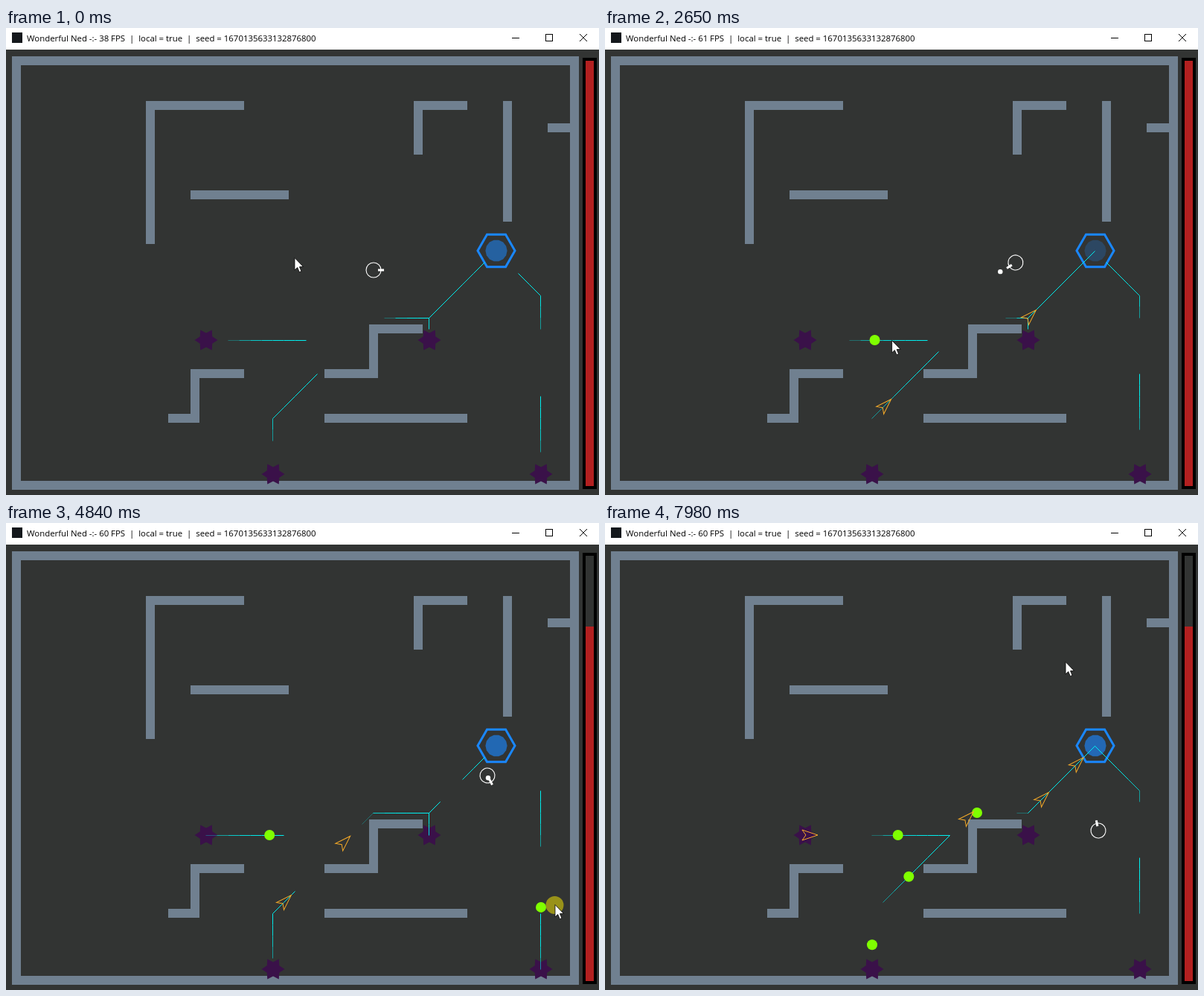
Animation of 797x627 px, one loop 8 s. Source, as an HTML page with a canvas:

```html
<!DOCTYPE html>
<html lang="en">
<head>
<meta charset="utf-8">
<title>Wonderful Ned</title>
<style>
  html, body { margin: 0; width: 100%; height: 100%; overflow: hidden; background: #323433; }
  canvas { display: block; }
</style>
</head>
<body>
<canvas id="stage" width="797" height="627"></canvas>
<script>
const ctx = document.getElementById('stage').getContext('2d');
const LOOP = 8000, CELL = 15, ORIGIN = 14;
const SPEED = 0.0504, BULLET_SPEED = 0.25, RANGE = 200;
const BG = '#323433', WALL = '#708090', BLUE = '#1a87ff', CYAN = '#00f0f0';
const BASE = { x: 659, y: 299 };

// Walks the grid from a cell: 'UR9' means nine cells up and right. Returns every node passed.
function walk(x, y, moves) {
  const node = () => ({ x: ORIGIN + x * CELL, y: ORIGIN + y * CELL });
  const nodes = [node()];
  for (const [, dirs, count] of moves.matchAll(/([UDLR]+)(\d+)/g)) {
    for (let i = 0; i < count; i++) {
      x += dirs.includes('R') - dirs.includes('L');
      y += dirs.includes('D') - dirs.includes('U');
      nodes.push(node());
    }
  }
  return nodes;
}

const WALLS = [
  walk(0, 2, 'R50 D38 L50 U38'),
  walk(20, 6, 'L8 D12'),
  walk(16, 14, 'R8'),
  walk(40, 6, 'L4 D4'),
  walk(44, 6, 'D10'),
  walk(48, 8, 'R2'),
  walk(20, 30, 'L4 D4 L2'),
  walk(28, 30, 'R4 U4 R4'),
  walk(28, 34, 'R12')
];

// Each spawner sends its crew (o ball, > dart) at a fixed interval; `hit` is when the first is shot.
const SPAWNERS = [
  { nodes: walk(17, 27, 'R13 UR2 R5 UR6'), first: 795, every: 2356, crew: 'ooo>', hit: 3400 },
  { nodes: walk(23, 39, 'U5 UR9 R5 UR6'), first: 665, every: 2222, crew: '>>oo' },
  { nodes: walk(37, 27, 'U2 UR6'), first: 1984, every: 3539, crew: '>>' },
  { nodes: walk(47, 39, 'U16 UL4'), first: 3192, every: 5000, crew: 'o', hit: 5515 }
];

// Key points: time, x, y
const MOUSE = [
  [0, 388, 309], [1860, 347, 420], [2700, 388, 420], [3250, 618, 388], [3390, 626, 386],
  [4840, 738, 513], [5450, 722, 512], [5860, 676, 512], [6960, 621, 347], [7980, 619, 187]
];
const PLAYER = [
  [0, 494, 325], [1860, 541, 317], [3390, 562, 313], [4840, 647, 339],
  [5860, 692, 366], [6960, 683, 458], [7980, 663, 413]
];

function at(keys, t) {
  let i = 1;
  while (i < keys.length - 1 && keys[i][0] < t) i++;
  const [t0, x0, y0] = keys[i - 1], [t1, x1, y1] = keys[i];
  const f = Math.min(1, (t - t0) / (t1 - t0));
  return { x: x0 + (x1 - x0) * f, y: y0 + (y1 - y0) * f };
}

function aim(t) {
  const p = at(PLAYER, t), m = at(MOUSE, t);
  return { ...p, angle: Math.atan2(m.y - p.y, m.x - p.x) };
}

const SHOTS = [2560, 2692, 3285, 4825, 5250, 5360].map(start => ({ start, ...aim(start) }));

function disc(x, y, r, color) {
  ctx.fillStyle = color;
  ctx.beginPath();
  ctx.arc(x, y, r, 0, Math.PI * 2);
  ctx.fill();
}

function poly(points) {
  ctx.beginPath();
  points.forEach(([x, y]) => ctx.lineTo(x, y));
  ctx.closePath();
}

function ring(count, radius) {
  return Array.from({ length: count }, (_, i) => {
    const a = i * 2 * Math.PI / count, r = radius(i);
    return [Math.cos(a) * r, Math.sin(a) * r];
  });
}

function fill(color) {
  ctx.fillStyle = color;
  ctx.fill();
}

function stroke(color, width) {
  ctx.strokeStyle = color;
  ctx.lineWidth = width;
  ctx.stroke();
}

function line(x0, y0, x1, y1, color) {
  ctx.beginPath();
  ctx.moveTo(x0, y0);
  ctx.lineTo(x1, y1);
  stroke(color, 1);
}

function placed(x, y, angle, draw) {
  ctx.save();
  ctx.translate(x, y);
  ctx.rotate(angle);
  draw();
  ctx.restore();
}

function titleBar(t) {
  ctx.fillStyle = '#fff';
  ctx.fillRect(0, 0, 797, 29);
  ctx.fillStyle = '#14181c';
  ctx.fillRect(8, 6, 14, 14);
  const fps = t < 600 ? 38 : 60 + Math.floor((t + 400) / 2000) % 2;
  ctx.fillStyle = '#000';
  ctx.font = '11.4px "Open Sans", "Noto Sans", sans-serif';
  ctx.fillText(`Wonderful Ned -:- ${fps} FPS  |  local = true  |  seed = 1670135633132876800`, 28, 18);
  line(680, 13.5, 690, 13.5, '#000');
  ctx.strokeRect(725.5, 8.5, 9, 9);
  line(771, 8, 781, 18, '#000');
  line(781, 8, 771, 18, '#000');
}

function wall(nodes) {
  ctx.beginPath();
  nodes.forEach(n => ctx.lineTo(n.x, n.y));
  ctx.lineCap = 'square';
  stroke(WALL, 12);
  ctx.lineCap = 'butt';
}

function healthBar(t) {
  ctx.fillStyle = '#000';
  ctx.fillRect(775, 40, 19, 579);
  ctx.fillStyle = BG;
  ctx.fillRect(779, 44, 11, 571);
  const top = t < 4540 ? 44 : 139;
  ctx.fillStyle = '#b22020';
  ctx.fillRect(779, top, 11, 615 - top);
}

function base(t) {
  const pulse = (5.985 + (t - 6960) / 1565) % 1;
  placed(BASE.x, BASE.y, 0, () => {
    ctx.globalAlpha = pulse;
    poly(ring(14, () => 14.6));
    fill(BLUE);
    ctx.globalAlpha = 1;
    poly(ring(6, () => 25));
    stroke(BLUE, 3);
  });
}

function spawner({ x, y }) {
  placed(x, y, 0, () => {
    poly(ring(12, i => i % 2 ? 9.5 : 15.5));
    fill('#3a1149');
  });
}

// Pulses hop from node to node, two per route, with a fading tail.
function trail(nodes, t) {
  const lag = 135 * Math.max(0, 1 - t / 1500);
  const phase = (0.8337 + (t - lag) / 1300) % 1;
  const period = nodes.length / 2, tail = period / 2;
  for (let j = 0; j < 3; j++) {
    const head = Math.floor((phase + j) * period);
    for (let d = 0; d + 0.5 < tail; d++) {
      const a = nodes[head - 1 - d], b = nodes[head - d];
      if (!a || !b) continue;
      ctx.globalAlpha = 1 - (d / tail) ** 3;
      line(a.x - 0.5, a.y + 0.5, b.x - 0.5, b.y + 0.5, CYAN);
    }
  }
  ctx.globalAlpha = 1;
}

function along(nodes, dist) {
  for (let i = 1; i < nodes.length; i++) {
    const a = nodes[i - 1], dx = nodes[i].x - a.x, dy = nodes[i].y - a.y;
    const len = Math.hypot(dx, dy);
    if (dist <= len) {
      const f = dist / len;
      return { x: a.x + dx * f, y: a.y + dy * f, angle: Math.atan2(dy, dx) };
    }
    dist -= len;
  }
  return null;
}

function enemy(nodes, kind, age) {
  const p = age >= 0 && along(nodes, age * SPEED);
  if (!p || Math.hypot(p.x - BASE.x, p.y - BASE.y) < 28) return;
  if (kind === 'o') return disc(p.x, p.y, 7, '#7fff00');
  placed(p.x, p.y, p.angle, () => {
    poly([[11, 0], [-10, 7], [-5, 0], [-10, -7]]);
    stroke('#f5aa28', 1);
  });
}

function crew({ nodes, first, every, crew, hit }, t) {
  [...crew].forEach((kind, i) => {
    const shotDown = i === 0 && t >= hit;
    if (!shotDown) enemy(nodes, kind, t - first - i * every);
  });
}

function shot({ start, x, y, angle }, t) {
  const dist = (t - start) * BULLET_SPEED, after = t - start - RANGE / BULLET_SPEED;
  if (dist < 0 || after > 150) return;
  const reach = Math.min(dist, RANGE);
  const px = x + Math.cos(angle) * reach, py = y + Math.sin(angle) * reach;
  if (after < 0) return disc(px, py, 3.2, '#fff');
  ctx.globalAlpha = 0.6 * (1 - after / 150);
  disc(px, py, 8, '#fff');
  ctx.globalAlpha = 1;
}

function player(t) {
  const { x, y, angle } = aim(t);
  placed(x, y, t < 45 ? 0 : angle, () => {
    ctx.beginPath();
    ctx.arc(0, 0, 10, 0, Math.PI * 2);
    stroke('#fff', 1.1);
    ctx.fillStyle = '#fff';
    ctx.fillRect(6, -1.5, 8, 3);
  });
}

function cursor(t) {
  const { x, y } = at(MOUSE, t);
  const pressed = SHOTS.some(s => t >= s.start && t < s.start + 90);
  if (pressed) disc(x - 0.5, y, 12, 'rgba(255,240,0,0.5)');
  placed(x, y, 0, () => {
    poly([[0, -0.5], [0, 16], [3.7, 12.5], [6.3, 18.7], [9, 17.5], [6.5, 11.6], [11.5, 11.4]]);
    fill('#fff');
    stroke('#000', 0.8);
  });
}

function draw(t) {
  ctx.fillStyle = BG;
  ctx.fillRect(0, 0, 797, 627);
  titleBar(t);
  WALLS.forEach(wall);
  healthBar(t);
  base(t);
  SPAWNERS.forEach(s => spawner(s.nodes[0]));
  SPAWNERS.forEach(s => trail(s.nodes, t));
  SPAWNERS.forEach(s => crew(s, t));
  SHOTS.forEach(s => shot(s, t));
  player(t);
  cursor(t);
}

const begin = performance.now();
function tick() {
  draw((performance.now() - begin) % LOOP);
  requestAnimationFrame(tick);
}
tick();
</script>
</body>
</html>
```
